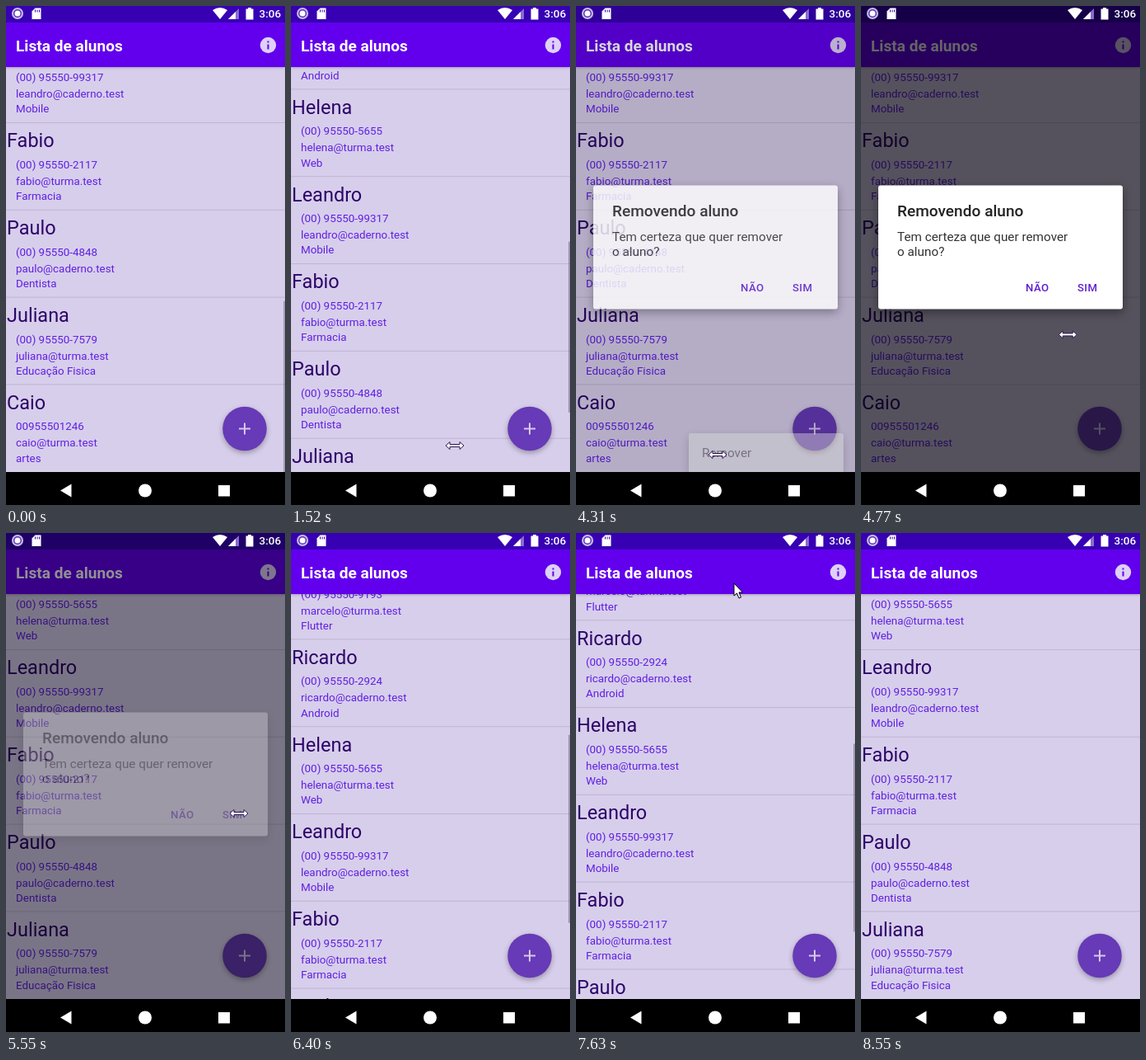
Recreate the animation shown at these times as an HTML page with a canvas. Size 339x605 px, loop 9250 ms.

```html
<!DOCTYPE html>
<html lang="pt-BR">
<head>
<meta charset="utf-8">
<title>Lista de alunos</title>
<style>
html, body { margin: 0; width: 339px; height: 605px; overflow: hidden; background: #000; }
canvas { display: block; }
</style>
</head>
<body>
<canvas id="stage" width="339" height="605"></canvas>
<script>
const LOOP = 9250, W = 339, H = 605, TOP = 74, BOTTOM = 565, VIEW = BOTTOM - TOP, ROW = 105.8;
const REMOVED_AT = 5460;
const stage = document.getElementById('stage').getContext('2d');
const layer = document.createElement('canvas');
layer.width = W;
layer.height = H;
let ctx = stage;

const SHORT = 'turma.test', LONG = 'caderno.test';
const students = [
  ['Camila', SHORT, 'Java'], ['Sergio', SHORT, 'Kotlin'], ['Renata', SHORT, 'Python'],
  ['Marcelo', SHORT, 'Flutter'], ['Ricardo', LONG, 'Android'], ['Helena', SHORT, 'Web'],
  ['Leandro', LONG, 'Mobile', '(00) 95550-99317'], ['Fabio', SHORT, 'Farmacia'],
  ['Paulo', LONG, 'Dentista'], ['Juliana', SHORT, 'Educação Fisica'],
  ['Caio', SHORT, 'artes', '00955501246']
].map(([name, host, course, phone], i) => ({
  name,
  lines: [phone || `(00) 95550-${1000 + i * 2731 % 9000}`, `${name.toLowerCase()}@${host}`, course]
}));

// The list follows the pointer from grab to release, then glides back to its end.
const swipes = [
  { grab: -900, grabY: 362, release: -800, rest: -40 },
  { grab: 980, grabY: 362, release: 1760, rest: 2480 },
  { grab: 6050, grabY: 87, release: 7200, rest: 8280 }
];

// Pointer moves: begin, end, x, y. It waits between them.
const moves = [
  [850, 980, 199, 362], [980, 1600, 199, 541], [1760, 2610, 140, 521],
  [3400, 3770, 172, 544], [4480, 4930, 283, 340], [5620, 6050, 170, 87],
  [6050, 6850, 170, 574], [7200, 7630, 192, 61], [7800, 8480, 304, 600]
];
const pointerShown = [[850, 6380], [6470, 8480]];

const ramp = (t, from, to) => Math.min(1, Math.max(0, (t - from) / (to - from)));
const smooth = p => p * p * (3 - 2 * p);

function pointerAt(t) {
  let x = 205, y = 350;
  for (const [begin, end, toX, toY] of moves) {
    const p = smooth(ramp(t, begin, end));
    x += (toX - x) * p;
    y += (toY - y) * p;
  }
  return { x, y };
}

function swipeOffset({ grab, grabY, release, rest }, t) {
  if (t < grab || t > rest) return 0;
  const pulled = pointerAt(Math.min(t, release)).y - grabY;
  return pulled * (1 - ramp(t, release, rest)) ** 2;
}

function rect(color, x, y, w, h) {
  ctx.fillStyle = color;
  ctx.fillRect(x, y, w, h);
}

function disc(color, x, y, r) {
  ctx.fillStyle = color;
  ctx.beginPath();
  ctx.arc(x, y, r, 0, 7);
  ctx.fill();
}

function poly(color, points, outline) {
  ctx.beginPath();
  points.forEach(([x, y]) => ctx.lineTo(x, y));
  ctx.closePath();
  ctx.fillStyle = color;
  ctx.fill();
  if (outline) {
    ctx.strokeStyle = outline;
    ctx.lineWidth = 1;
    ctx.stroke();
  }
}

function text(str, x, y, size, color, weight = 400) {
  ctx.font = `${weight} ${size}px Roboto, sans-serif`;
  ctx.fillStyle = color;
  ctx.fillText(str, x, y);
}

function withShadow(blur, dy, alpha, draw) {
  ctx.save();
  ctx.shadowColor = `rgba(0,0,0,${alpha})`;
  ctx.shadowBlur = blur;
  ctx.shadowOffsetY = dy;
  draw();
  ctx.restore();
}

function card(x, y, w, h) {
  withShadow(12, 4, .4, () => {
    ctx.fillStyle = '#fff';
    ctx.beginPath();
    ctx.roundRect(x, y, w, h, 3);
    ctx.fill();
  });
}

// Draws a group on its own layer and blends it as a whole.
function faded(alpha, draw) {
  if (alpha <= 0) return;
  ctx = layer.getContext('2d');
  ctx.clearRect(0, 0, W, H);
  draw();
  ctx = stage;
  ctx.globalAlpha = alpha;
  ctx.drawImage(layer, 0, 0);
  ctx.globalAlpha = 1;
}

function drawList(t) {
  const count = students.length - (t >= REMOVED_AT ? 1 : 0);
  const content = count * ROW;
  const scroll = content - VIEW - swipes.reduce((sum, s) => sum + swipeOffset(s, t), 0);
  rect('#d7ceeb', 0, TOP, W, VIEW);
  students.slice(0, count).forEach(({ name, lines }, i) => {
    const y = TOP + i * ROW - scroll;
    if (i) rect('#bfb5d2', 0, y - .8, W, 1);
    text(name, 1, y + 29.6, 23.5, '#2d0469');
    lines.forEach((line, n) => text(line, 12, y + [55.2, 75.2, 93.4][n], 13.4, '#6020e2'));
  });
  const swipe = swipes.find(s => t >= s.grab && t < s.rest + 270);
  if (swipe) {
    const alpha = .3 * (1 - ramp(t, swipe.rest + 20, swipe.rest + 270));
    rect(`rgba(40,30,60,${alpha})`, 337, TOP + scroll / content * VIEW, 2, VIEW * VIEW / content);
  }
}

function drawFab() {
  withShadow(6, 2.5, .3, () => disc('#673ab7', 290, 512.5, 26.8));
  rect('#d5c8ec', 283, 511.5, 14, 2);
  rect('#d5c8ec', 289, 505.5, 2, 14);
}

function drawToolbar() {
  withShadow(3, 1, .25, () => rect('#6200ee', 0, 20, W, TOP - 20));
  rect('#3700b3', 0, 0, W, 20);
  text('Lista de alunos', 12, 55, 19.1, '#fff', 600);
  disc('#ded0f6', 318.5, 47.5, 9.7);
  rect('#6200ee', 317.5, 42.5, 2, 2);
  rect('#6200ee', 317.5, 46.5, 2, 6);
}

function drawStatusIcons() {
  disc('#c9bde8', 14, 9, 7);
  disc('#5c33bb', 14, 9, 5);
  disc('#fff', 14, 9, 3.5);
  poly('#fff', [[35.5, 2.5], [42.5, 2.5], [42.5, 16], [31.5, 16], [31.5, 6.5]]);
  for (let x = 35; x <= 40; x += 2.5) rect('#3700b3', x, 4.5, 1, 3);
  ctx.fillStyle = '#fff';
  ctx.beginPath();
  ctx.moveTo(260, 16);
  ctx.lineTo(251, 5);
  ctx.quadraticCurveTo(260, -1, 269, 5);
  ctx.fill();
  poly('#8a6bd2', [[283, 3], [283, 16], [270, 16]]);
  poly('#fff', [[279, 7], [279, 16], [270, 16]]);
  rect('#fff', 291.5, 3.5, 9, 13);
  rect('#fff', 294, 2, 4, 2);
  text('3:06', 307.5, 14, 13.5, '#fff', 500);
}

function drawNavBar() {
  rect('#000', 0, BOTTOM, W, H - BOTTOM);
  poly('#fff', [[66, 587.5], [79.5, 579.5], [79.5, 595.5]]);
  disc('#fff', 169, 587.5, 8);
  rect('#fff', 258, 581, 14, 13.5);
}

function drawPopup() {
  card(137, 518, 188, 48);
  text('Remover', 153, 547, 15.3, '#333');
}

function drawDialog() {
  card(21, 217.5, 297, 150);
  text('Removendo aluno', 44, 255, 19.1, '#222', 500);
  text('Tem certeza que quer remover', 44, 284.5, 15.3, '#333');
  text('o aluno?', 44, 302.5, 15.3, '#333');
  ctx.letterSpacing = '0.4px';
  text('NÃO', 200, 346, 13.2, '#5f1fd0', 500);
  text('SIM', 263, 346, 13.2, '#5f1fd0', 500);
  ctx.letterSpacing = '0px';
}

function drawPointer(t) {
  if (!pointerShown.some(([from, to]) => t >= from && t < to)) return;
  const { x, y } = pointerAt(t);
  ctx.save();
  ctx.translate(x, y);
  if (t > 7560) {
    poly('#fff', [[0, 0], [0, 15], [3.5, 12], [6, 18], [8.5, 17], [6, 11], [10.5, 11]], '#000');
  } else {
    const half = [[-11, 0], [-6, -4.5], [-6, -1.5], [6, -1.5], [6, -4.5], [11, 0]];
    const mirrored = half.map(([px, py]) => [-px, -py]);
    poly('#fff', [...half, ...mirrored], '#2b1550');
  }
  ctx.restore();
}

function render(t) {
  drawList(t);
  drawFab();
  drawToolbar();
  faded(ramp(t, 3160, 3360) - ramp(t, 4250, 4360), drawPopup);
  faded(.6 * (ramp(t, 4270, 4430) - ramp(t, 5490, 5700)), () => rect('#000', 0, 0, W, BOTTOM));
  faded(ramp(t, 4230, 4330) - ramp(t, 5470, 5580), drawDialog);
  drawStatusIcons();
  drawNavBar();
  drawPointer(t);
}

const start = performance.now();
function frame() {
  render((performance.now() - start) % LOOP);
  requestAnimationFrame(frame);
}
frame();
</script>
</body>
</html>
```
